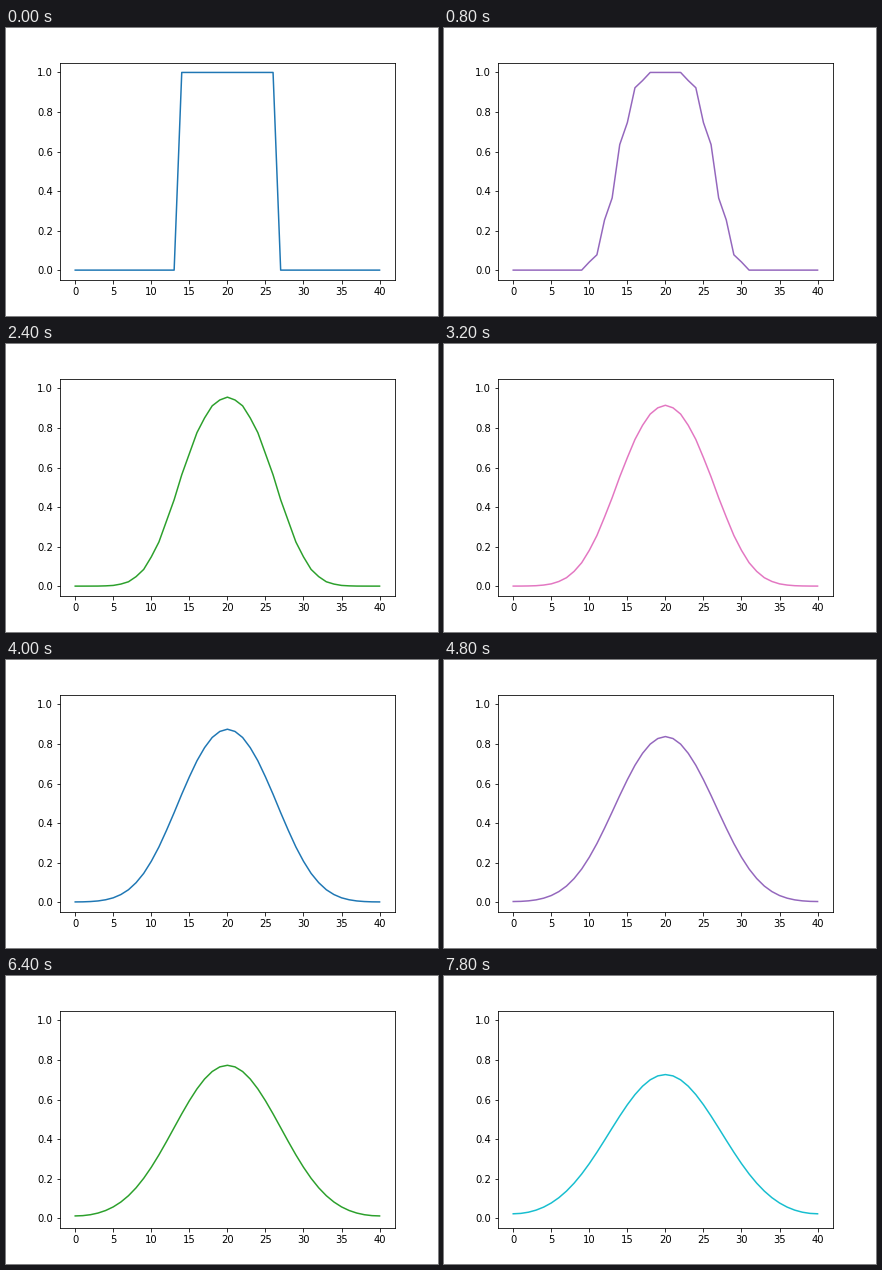
A matplotlib script for the animation above (8 s loop, 432x288 px).

```python
import numpy as np
import matplotlib.pyplot as plt
from matplotlib.animation import FuncAnimation

FRAMES = 40
INTERVAL = 200
CELLS = 40
R = 0.45  # diffusion number of the explicit scheme


def step(u):
    """Advance the heat equation once, with insulated (mirrored) ends."""
    p = np.pad(u, 1, mode="reflect")
    return u + R * (p[2:] - 2 * u + p[:-2])


x = np.arange(CELLS + 1)
states = [np.where((x > CELLS / 3) & (x < 2 * CELLS / 3), 1.0, 0.0)]
while len(states) < FRAMES:
    states.append(step(states[-1]))

fig, ax = plt.subplots(figsize=(6, 4), dpi=72)
fig.subplots_adjust(left=0.125, right=0.9, bottom=0.125, top=0.88)
line, = ax.plot(x, states[0], color="C0")
ax.set_xlim(-2, 42)
ax.set_ylim(-0.05, 1.05)


def draw(n):
    line.set_ydata(states[n])
    line.set_color(f"C{n % 10}")
    return line,


anim = FuncAnimation(fig, draw, frames=FRAMES, interval=INTERVAL,
                     repeat=True, repeat_delay=0)
plt.show()
```
